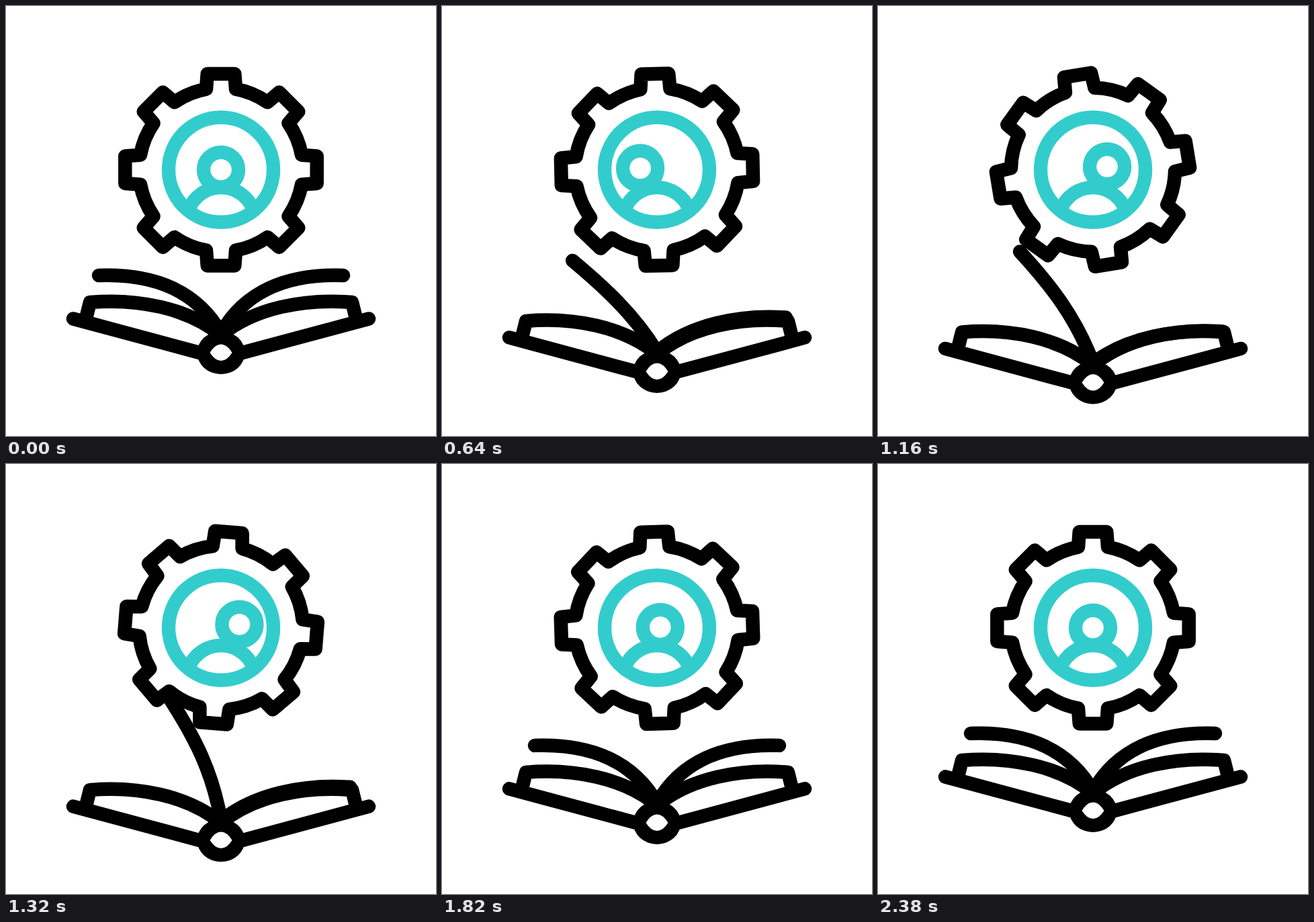
An HTML page for the animation above (2400 ms loop, 640 by 640 pixels).

```html
<!DOCTYPE html>
<html lang="en">
<head>
<meta charset="utf-8">
<title>Guide book</title>
<style>
html, body { margin: 0; width: 100%; height: 100%; overflow: hidden; background: #fff; }
svg { display: block; width: 100vw; height: 100vh; }
.line { fill: none; stroke: #000; stroke-width: 20.5; stroke-linecap: round; stroke-linejoin: round; }
.teal { fill: none; stroke: #33cccc; stroke-width: 20.4; }
</style>
</head>
<body>
<svg viewBox="0 0 640 640">
  <path id="gear" class="line"/>
  <circle class="teal" cx="320" cy="243.7" r="78"/>
  <path class="teal" d="M272 303A51.4 51.4 0 0 1 368 303"/>
  <circle id="head" class="teal" r="26"/>
  <g id="book">
    <g id="half" class="line">
      <path d="M100 465.5L290 516.5"/>
      <path d="M119.500 463L125 441C195 435 270 449 320 490"/>
    </g>
    <use href="#half" transform="matrix(-1 0 0 1 640 0)"/>
    <path id="left" class="line"/>
    <path id="right" class="line"/>
    <ellipse cx="320" cy="516" rx="35.500" ry="32"/>
    <path fill="#fff" d="M303.500 516Q311 503.500 320 503.500T336.500 516Q329 528 320 528T303.500 516"/>
  </g>
</svg>
<script>
const LOOP = 2400, CX = 320, CY = 243.7;
const el = id => document.getElementById(id);
const mix = (a, b, p) => a + (b - a) * p;

// Ease with control points (x1, 0) and (x2, 1).
function ease(u, x1, x2) {
  if (u <= 0) return 0;
  if (u >= 1) return 1;
  let lo = 0, hi = 1, s = 0.5;
  for (let i = 0; i < 24; i++) {
    const r = 1 - s;
    const x = 3 * x1 * s * r * r + 3 * x2 * s * s * r + s * s * s;
    if (x < u) lo = s; else hi = s;
    s = (lo + hi) / 2;
  }
  return s * s * (3 - 2 * s);
}

// Each move: [start, end, target values, x1, x2].
function track(t, from, moves) {
  let v = from;
  for (const [a, b, to, x1 = 0.66, x2 = 0.3] of moves) {
    if (t <= a) break;
    const p = ease((t - a) / (b - a), x1, x2);
    v = v.map((n, i) => mix(n, to[i], p));
  }
  return v;
}

function gearPath() {
  const base = 122, half = 10.4;
  let d = "";
  const add = (cmd, x, y, turn) => {
    const c = Math.cos(turn), s = Math.sin(turn);
    d += `${cmd}${(x * c - y * s).toFixed(2)} ${(x * s + y * c).toFixed(2)}`;
  };
  const bx = base * Math.sin(half * Math.PI / 180);
  const by = -base * Math.cos(half * Math.PI / 180);
  for (let k = 0; k < 8; k++) {
    const turn = k * Math.PI / 4;
    add(k ? `A${base} ${base} 0 0 1 ` : "M", -bx, by, turn);
    add("L", -20.3, -142.7, turn);
    add("L", 20.3, -142.7, turn);
    add("L", bx, by, turn);
  }
  return d + `A${base} ${base} 0 0 1 ${-bx} ${by}Z`;
}

// Page poses: tip, then two curve handles; the curve ends at the spine.
const open = [138, 401, 222, 398, 285, 425];
const flat = [127, 440, 195, 435, 270, 449];
const sag = [139, 403, 200, 411, 270, 437];
const low = [211, 321, 258, 372, 295, 420];
const mid = [245, 303, 279, 371, 302, 427];
const high = [283, 290, 305, 350, 322, 405];
const flip = pose => pose.map((n, i) => i % 2 ? n : 640 - n);
const blend = p => open.map((n, i) => mix(n, flat[i], p));
const page = ([x, y, a, b, c, d]) => `M${x} ${y}C${a} ${b} ${c} ${d} 320 487`;

// Head offset x, y and gear angle.
const swing = [
  [0, 688, [-25, -2.2, 360]],
  [711, 1387, [27.8, -5, -270]],
  [1410, 2050, [0, 0, 0], 0.75, 0.3]
];
const lift = [[15, 1200, [44.5]], [1200, 2400, [0]]];
const leftMoves = [
  [60, 380, sag, 0.4, 0.6],
  [400, 890, mid, 0.45, 0.5],
  [905, 1155, low, 0.4, 0.6],
  [1165, 1490, high, 0.4, 0.6],
  [1505, 1810, open, 0.45, 0.5]
];
const rightMoves = [
  [0, 375, blend(0.86), 0.5, 0.4],
  [400, 1140, flat, 0.5, 0.5],
  [1200, 1490, blend(0.75), 0.5, 0.5],
  [1500, 1810, open, 0.4, 0.5]
];

el("gear").setAttribute("d", gearPath());

function draw(t) {
  const [hx, hy, turn] = track(t, [0, 0, 0], swing);
  el("gear").setAttribute("transform", `translate(${CX} ${CY}) rotate(${turn})`);
  el("head").setAttribute("transform", `translate(${CX + hx} ${CY + hy})`);
  el("book").setAttribute("transform", `translate(0 ${track(t, [0], lift)[0]})`);
  el("left").setAttribute("d", page(track(t, open, leftMoves)));
  el("right").setAttribute("d", page(flip(track(t, open, rightMoves))));
}

const start = performance.now();
function tick() {
  draw((performance.now() - start) % LOOP);
  requestAnimationFrame(tick);
}
draw(0);
requestAnimationFrame(tick);
</script>
</body>
</html>
```
